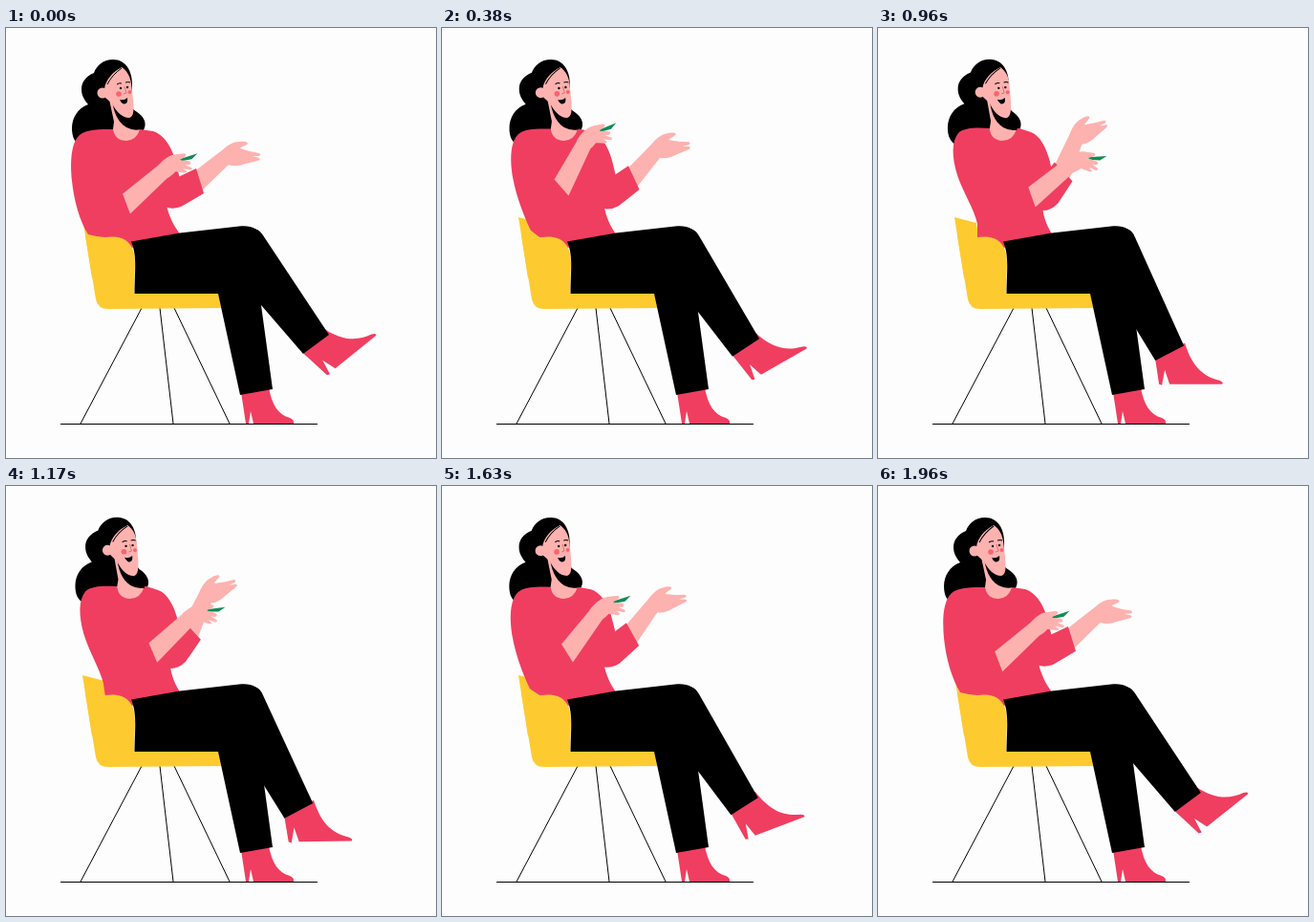
These frames come from a looping animation (450 by 450 pixels, 2 s). An HTML page:

```html
<!DOCTYPE html>
<html lang="en">
<head>
<meta charset="utf-8">
<title>Seated woman talking</title>
<style>
  html, body { margin: 0; width: 100%; height: 100%; overflow: hidden; background: #fdfdfd; }
  svg { display: block; width: 100vw; height: 100vh; }
  .pink { fill: #f03e60; }
  .skin { fill: #fdb2af; }
  .gold { fill: #fdcb30; }
  .pen { fill: #118a55; }
  .line { fill: none; stroke: #000; stroke-width: 1; }
</style>
</head>
<body>
<svg viewBox="0 0 450 450">
  <path class="line" d="M142 293 78 414M161 293 175 414M176 293 234 414M57 414.500H326"/>

  <g id="hair">
    <path d="M132 58C132 46 126 33 112 33C102 33 95 39 92 47C83 51 79 57 79 64C79 71 82 75 86 80C75 84 69 94 69 105C69 114 72 121 80 124L138 112C149 106 149 93 132 85Z"/>
  </g>

  <path class="gold" d="M80 198 103 204 108 240 90 262Z"/>

  <g id="far">
    <path class="skin" d="M196 151 226 128C233 122 238 119 244 119C250 118 255 120 252 122C249 124 246 124 245 126L255 129 265 131Q268 133 264 134L258 134 265 136Q267 138 263 139L251 142Q240 146 233 143L203 172Z"/>
    <path class="pink" d="M199 147 207 173Q192 182 183 187Q172 191 164 186L156 160 178 157Z"/>
  </g>
  <path id="torso" class="pink"/>

  <g id="head">
    <path class="skin" d="M107 70 113 98 112 106Q114 118 126 118Q137 117 140 106L131 98 125 75Z"/>
    <path d="M111 74C112 86 116 98 126 104Q134 108 141 106L138 92 130 80Z"/>
    <circle class="skin" cx="101" cy="68" r="5.5"/>
    <path class="skin" d="M103 64C104 54 112 46 121 41C127 45 130 51 131 58L133 75C134 85 134 93 129 94C121 94 115 87 111 79L104 73Z"/>
    <path class="line" d="M106 59Q111 49 121 42"/>
    <circle cx="118" cy="69" r="2.8" fill="#f8646f"/>
    <circle cx="129.500" cy="67" r="2" fill="#f8646f"/>
    <circle cx="120" cy="63" r="1.2"/>
    <circle cx="127" cy="62" r="1.2"/>
    <path d="M116 59Q119 57 121 58M125 57Q128 56 130 57" class="line" stroke-width=".8"/>
    <path d="M124 61 126 68 123 69" fill="none" stroke="#c9686c" stroke-width=".8"/>
    <path d="M119 75Q124 76 127 73Q128 80 123 79.500Q120 78 119 75Z"/>
  </g>

  <g id="near">
    <path class="skin" d="M4-10.500 54-8Q60 0 54 8L-4 10.500Z"/>
    <g id="hand">
      <path class="pen" d="M15 -11 34 -17 28 -11 17 -9Z"/>
      <path class="skin" d="M-9 -2C-2 -11 5 -16 12 -16L20 -17Q24 -16 20 -13L15 -10 25 -9Q29 -7 25 -5L21 -5 28 -2Q29 1 25 0L19 -1 23 2Q22 4 18 3L11 2Q5 9 -2 10Z"/>
    </g>
  </g>

  <path class="gold" d="M83 217 104 219C125 216 135 226 135 246L134 278H232V293L107 294Q96 294 94 284Z"/>

  <path class="pink" d="M246 381 251 414H254L256 401 259 414H301Q302 410 297 408C285 405 278 394 275 376Z"/>
  <g id="leg">
    <g id="foot"><path class="pink" d="M-16-1-11 32-8 33-5 17 0 32H55Q57 30 52 28C36 24 24 15 16-11Z"/></g>
    <path d="M252 212C260 208 265 211 269 217L338 321 311 341 267 290 238 255Z"/>
  </g>
  <path d="M131 223.500 182 214.500 244 207.500C256 206 264 210 268 217L264 268 279 378 245 384 222 278H134.500C135 250 137 238 131 223.500Z"/>
</svg>
<script>
const LOOP = 2000, FRAME = 1000 / 24;
const TIMES = [0, 375, 625, 958, 1375, 1625];

// One value per entry of TIMES
const TRACKS = {
  lean: [0, .38, .8, 1, .66, .34],
  leg: [0, 3.2, 6, 9.3, 7.6, 3.9],
  foot: [-39, -33, -23.5, -9.3, -10.6, -24.5],
  far: [0, -8, -17, -26.5, -22, -12],
  nearX: [126, 125, 135, 161, 142, 131],
  nearY: [184, 167, 165, 177, 172, 175],
  nearTurn: [-41.5, -62.5, -70, -40, -49, -53],
  handTurn: [0, -5, -5, 14, 5, 0]
};

const BACK = "M112 106C98 106 84 106 77 112C68 120 67 140 69 160C71 180 77 202 86 216L104 220L132 230L183 217C176 208 171 198 168 186L184 165L176 135C172 122 164 111 154 108L140 106Z";
const FORWARD = "M117 105C104 104 90 104 84 110C77 119 77 134 83 154C89 172 101 190 104 205L104 221L132 230L183 217C177 208 173 198 172 186L184 160L180 140C176 125 170 113 160 109L148 105Z";
const forwardNums = FORWARD.match(/[\d.]+/g).map(Number);

const $ = id => document.getElementById(id);
const turn = (id, value) => $(id).setAttribute("transform", value);

// Smooth periodic curve through the keys, flat at each peak
function sample(values, t) {
  const n = TIMES.length;
  const time = i => TIMES[(i + n) % n] + LOOP * Math.floor(i / n);
  const value = i => values[(i + n) % n];
  const slope = i => {
    const a = (value(i) - value(i - 1)) / (time(i) - time(i - 1));
    const b = (value(i + 1) - value(i)) / (time(i + 1) - time(i));
    return a * b <= 0 ? 0 : 2 * a * b / (a + b);
  };
  let i = n - 1;
  while (TIMES[i] > t) i--;
  const span = time(i + 1) - time(i);
  const u = (t - time(i)) / span, v = 1 - u;
  return v * v * (1 + 2 * u) * value(i) + u * v * v * span * slope(i)
    + u * u * (1 + 2 * v) * value(i + 1) - u * u * v * span * slope((i + 1) % n);
}

function torsoPath(p) {
  let i = 0;
  return BACK.replace(/[\d.]+/g, a => (+a + (forwardNums[i++] - a) * p).toFixed(2));
}

function draw(t) {
  const pose = {};
  for (const key in TRACKS) pose[key] = sample(TRACKS[key], t);
  const { lean, leg, foot, far, nearX, nearY, nearTurn, handTurn } = pose;

  $("torso").setAttribute("d", torsoPath(lean));
  turn("head", `translate(${5 * lean} 0) rotate(${2 * lean} 125 100)`);
  turn("hair", `translate(${4 * lean} 0) rotate(${lean} 125 100)`);
  turn("far", `rotate(${far} 178 174)`);
  turn("near", `translate(${nearX} ${nearY}) rotate(${nearTurn})`);
  turn("hand", `translate(54 0) rotate(${handTurn - nearTurn})`);
  turn("leg", `rotate(${leg} 258 217)`);
  turn("foot", `translate(324.5 331.5) rotate(${foot})`);
}

const start = performance.now();
function tick() {
  const t = (performance.now() - start) % LOOP;
  draw(Math.floor((t + 4.9) / FRAME) * FRAME % LOOP);
  requestAnimationFrame(tick);
}
draw(0);
requestAnimationFrame(tick);
</script>
</body>
</html>
```
